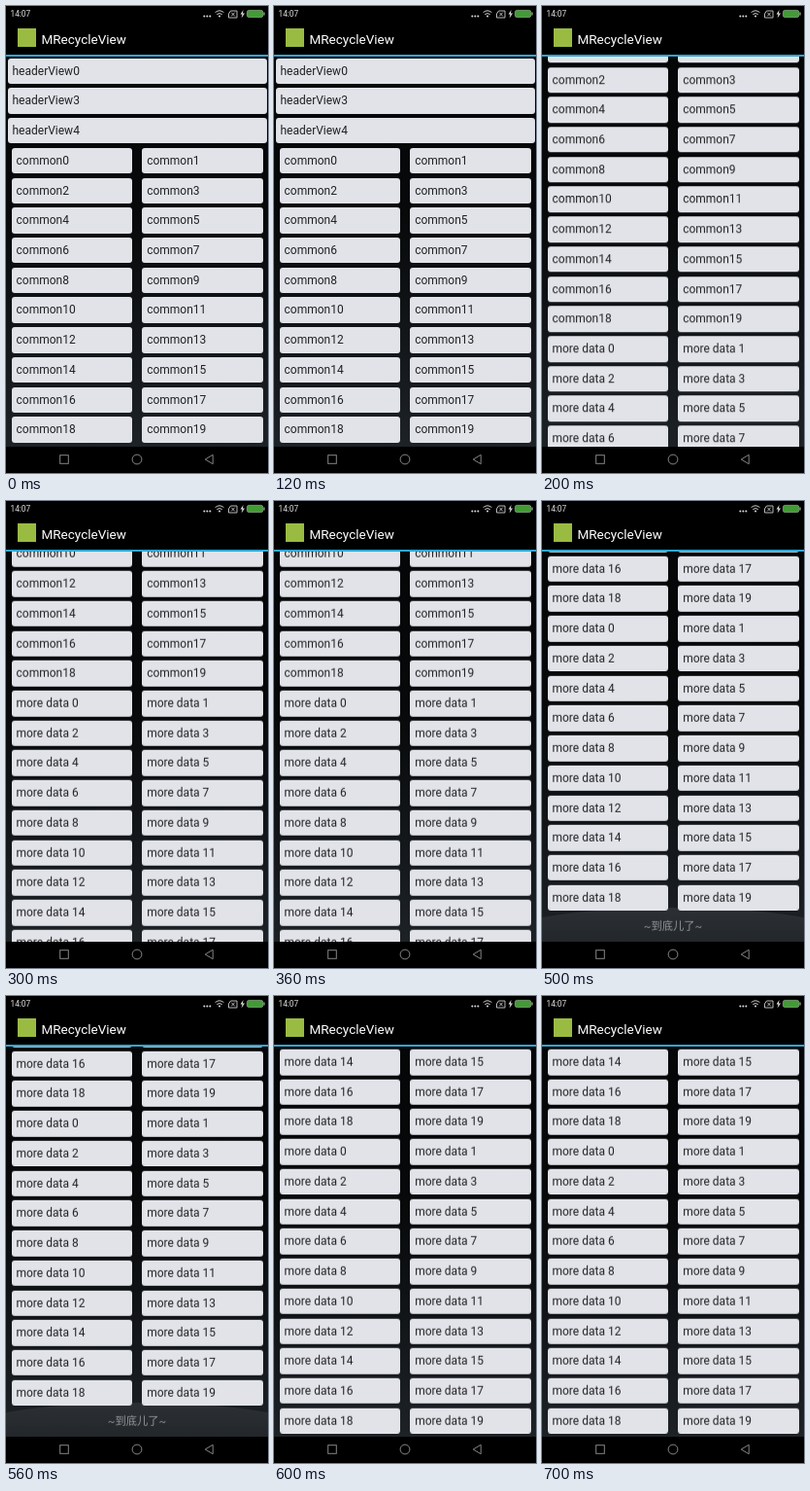
Recreate the animation shown at these times as an HTML page. Size 270 by 480 pixels, loop 800 ms.

```html
<!DOCTYPE html>
<html lang="en">
<head>
<meta charset="utf-8">
<title>MRecycleView</title>
<style>
  html, body { margin: 0; width: 100%; height: 100%; overflow: hidden; background: #000; }
  #stage {
    position: relative; width: 270px; height: 480px; overflow: hidden;
    background: #000; color: #fff; font: 12px Roboto, "Noto Sans", sans-serif;
  }
  #view {
    position: absolute; top: 51px; left: 0; width: 270px; height: 402px; overflow: hidden;
    background: linear-gradient(#050607, #07090a 40%, #1d2227);
  }
  #list {
    position: absolute; top: -51px; left: 0; width: 270px;
    animation: scroll .8s step-end infinite;
  }
  .card {
    position: absolute; box-sizing: border-box; height: 26.5px; padding-left: 5px;
    border-radius: 3px; background: #e1e3e8; color: #202123;
    line-height: 27px; white-space: pre;
  }
  .head { left: 1.5px; width: 267px; }
  .cell { width: 124.5px; }
  #end {
    position: absolute; top: 1072px; width: 270px; line-height: 16px; text-align: center;
    color: #96999c; font: 11.25px/16px Roboto, "Noto Sans CJK SC", "Noto Sans CJK", sans-serif;
  }
  #glow {
    position: absolute; left: -45px; bottom: -24px; width: 360px; height: 59px; border-radius: 50%;
    background: linear-gradient(#34373a, #25292d 60%);
    opacity: 0; animation: glow .8s step-end infinite;
  }
  #line { position: absolute; top: 50px; width: 270px; height: 2px; background: #2da6d4; }
  #icon { position: absolute; left: 12px; top: 23px; width: 19px; height: 19px; background: #9abb42; }
  #title { position: absolute; left: 36.5px; top: 25px; font-size: 13.5px; line-height: 18px; }
  #clock { position: absolute; left: 4.5px; top: 3px; font-size: 8.3px; line-height: 11px; color: #ddd; }
  svg { position: absolute; left: 0; top: 0; }

  @keyframes scroll {
    0%    { transform: none; }
    25%   { transform: translateY(-113.8px); }
    37.5% { transform: translateY(-258.3px); }
    50%   { transform: translateY(-526.3px); }
    62.5% { transform: translateY(-642.2px); }
    75%, 100% { transform: translateY(-613.3px); }
  }
  @keyframes glow {
    0%    { opacity: 0; }
    62.5% { opacity: .75; }
    75%, 100% { opacity: 0; }
  }
</style>
</head>
<body>
<div id="stage">
  <div id="view">
    <div id="glow"></div>
    <div id="list"><div id="end">~到底儿了~</div></div>
  </div>
  <div id="line"></div>
  <div id="icon"></div>
  <div id="title">MRecycleView</div>
  <div id="clock">14:07</div>
  <svg width="270" height="480" fill="none" stroke="#ccc">
    <!-- status bar -->
    <g fill="#ddd" stroke="none">
      <circle cx="204.3" cy="10.5" r="1"/>
      <circle cx="207.3" cy="10.5" r="1"/>
      <circle cx="210.3" cy="10.5" r="1"/>
      <circle cx="220" cy="10.6" r="1"/>
      <path d="M244.5 4 241.6 8.5h1.9L242.6 12.5 246 7.4h-2z"/>
    </g>
    <path d="M215.6 6.6q4.4-3.6 8.8 0M217.3 8.6q2.7-2.1 5.4 0"/>
    <path d="M229.5 8l2-3h6.5v7h-8.5zM232.3 6.7l3.4 3.6M235.7 6.7l-3.4 3.6" stroke-width=".9"/>
    <rect x="248.4" y="4.4" width="16.4" height="7.2" rx="2" fill="#429b35" stroke="#8aa786" stroke-width=".8"/>
    <path d="M266 6.5v3"/>
    <!-- navigation bar -->
    <g stroke="#858585">
      <rect x="55.7" y="461.7" width="8.6" height="8.6"/>
      <circle cx="135" cy="466" r="4.9"/>
      <path d="M205.2 466l8-4.7v9.4z" stroke-linejoin="round"/>
    </g>
  </svg>
</div>
<script>
  const PITCH = 30.72;
  const list = document.getElementById('list');

  function addCard(kind, text, top, left) {
    const card = document.createElement('div');
    card.className = 'card ' + kind;
    card.textContent = text;
    card.style.top = top + 'px';
    if (left) card.style.left = left + 'px';
    list.append(card);
  }

  [0, 3, 4].forEach((n, i) => addCard('head', 'headerView' + n, 53.5 + i * PITCH));

  // Three batches of twenty items in two columns
  for (let i = 0; i < 60; i++) {
    const text = (i < 20 ? 'common' : 'more data ') + i % 20;
    addCard('cell', text, 145.8 + Math.floor(i / 2) * PITCH, i % 2 ? 140.2 : 5.5);
  }
</script>
</body>
</html>
```
